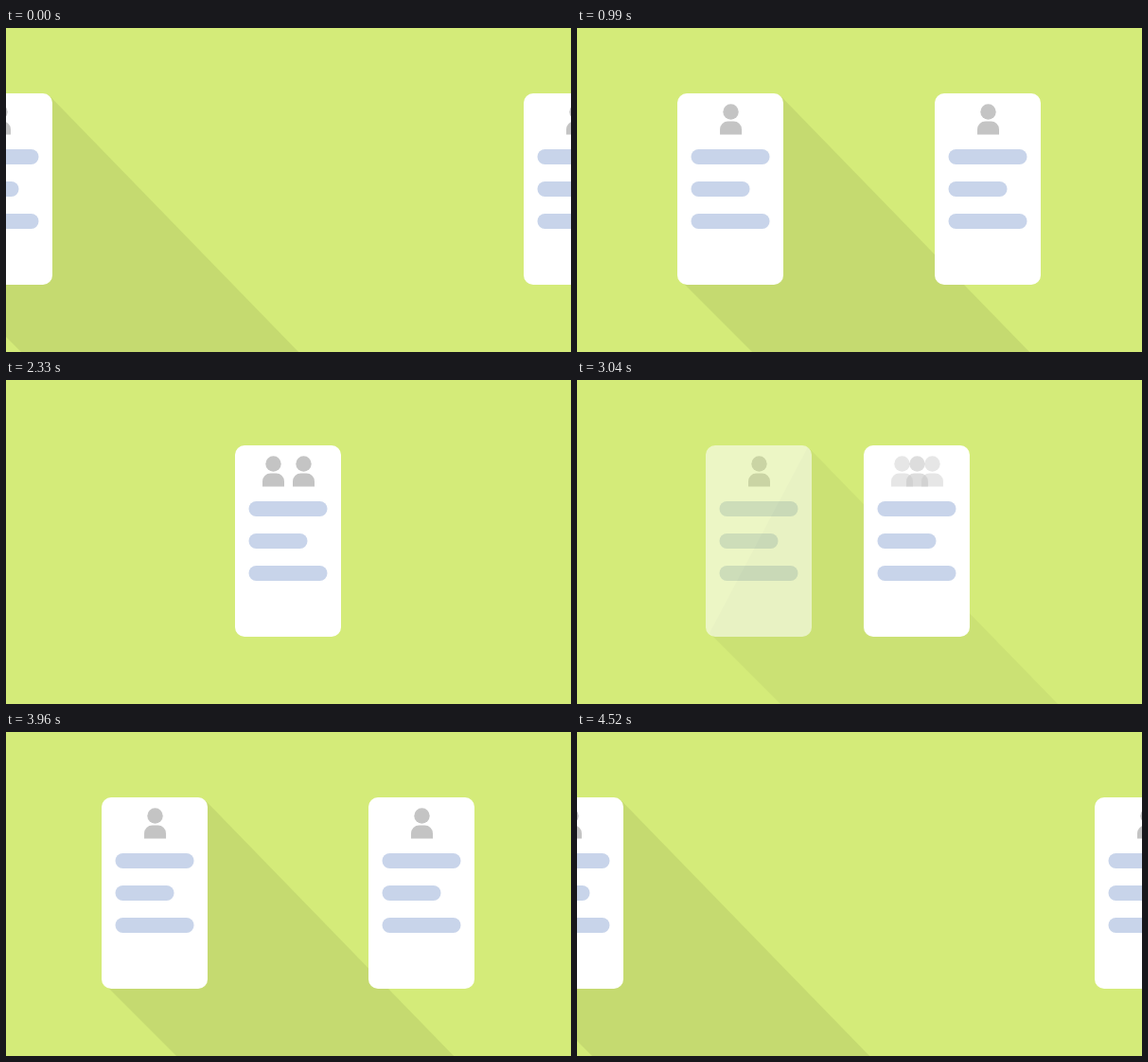
Write an HTML page that moves like this. It is 597 px wide and 342 px high and loops after 4.93 s.

```html
<!DOCTYPE html>
<html lang="en">
<head>
<meta charset="utf-8">
<title>Merging cards</title>
<style>
  html, body { margin: 0; width: 100%; height: 100%; overflow: hidden; background: #d4eb79; }
  svg { display: block; width: 597px; height: 342px; }

  .sheet { fill: #fff; }
  .bar { fill: #c8d4ea; }
  .person { fill: #c4c4c4; }
  .shadow { fill: #000; fill-opacity: .07; }

  /* The script moves the clock; the keyframes hold the poses. */
  .left, .right, .fade, .pair {
    animation: 4930ms cubic-bezier(0, 0, .58, 1) calc(var(--clock, 0) * -1ms) infinite paused;
  }
  .left { animation-name: left; }
  .right { animation-name: right; }
  .fade { animation-name: fade; }
  .pair { animation-name: pair; }

  /* Moves of 600 ms begin at 586, 1686, 2798 and 3894 ms. */
  @keyframes left {
    0%, 11.886%, 91.156%, 100% { transform: translate(-63px, 69px); }
    24.057%, 78.986% { transform: translate(136px, 69px); }
  }
  @keyframes right {
    0%, 11.886%, 91.156%, 100% { transform: translate(547px, 69px); }
    24.057%, 34.199%, 68.925%, 78.986% { transform: translate(348px, 69px); }
    46.369%, 56.755% { transform: translate(242px, 69px); }
  }
  @keyframes fade {
    0%, 34.199%, 68.925%, 100% { opacity: 1; }
    46.369%, 56.755% { opacity: 0; }
  }
  @keyframes pair {
    0%, 34.199%, 68.925%, 100% { opacity: 0; }
    46.369%, 56.755% { opacity: 1; }
  }
</style>
</head>
<body>
<svg viewBox="0 0 597 342">
  <defs>
    <g id="card">
      <rect class="sheet" width="112" height="202" rx="10"/>
      <rect class="bar" x="14.5" y="59" width="83" height="16" rx="8"/>
      <rect class="bar" x="14.5" y="93" width="62" height="16" rx="8"/>
      <rect class="bar" x="14.5" y="127" width="83" height="16" rx="8"/>
    </g>
    <g id="person" class="person">
      <circle cx="56.5" cy="19.5" r="8.2"/>
      <path d="M45 43.5v-5.5a8.5 8.5 0 0 1 8.5-8.5h6a8.5 8.5 0 0 1 8.5 8.5v5.5z"/>
    </g>
  </defs>

  <g class="left">
    <path class="shadow fade" d="M108 1.5L808 721L604 798L4 198z"/>
    <g class="fade">
      <use href="#card"/>
      <use href="#person"/>
    </g>
  </g>

  <g class="right">
    <use href="#card"/>
    <g class="pair">
      <use href="#person" x="-16"/>
      <use href="#person" x="16"/>
    </g>
    <use class="fade" href="#person"/>
  </g>
</svg>

<script>
  const LOOP = 4930;
  const TICK = 45;
  const MOVES = [3960, 2860, 1730, 630];
  const origin = performance.now();

  // Each move advances in even ticks counted from its first visible change.
  function snap(time) {
    const start = MOVES.find(m => time >= m);
    return start === undefined ? 0 : start + Math.floor((time - start) / TICK) * TICK;
  }

  function draw() {
    const time = (performance.now() - origin) % LOOP;
    document.documentElement.style.setProperty('--clock', snap(time));
    requestAnimationFrame(draw);
  }
  draw();
</script>
</body>
</html>
```
